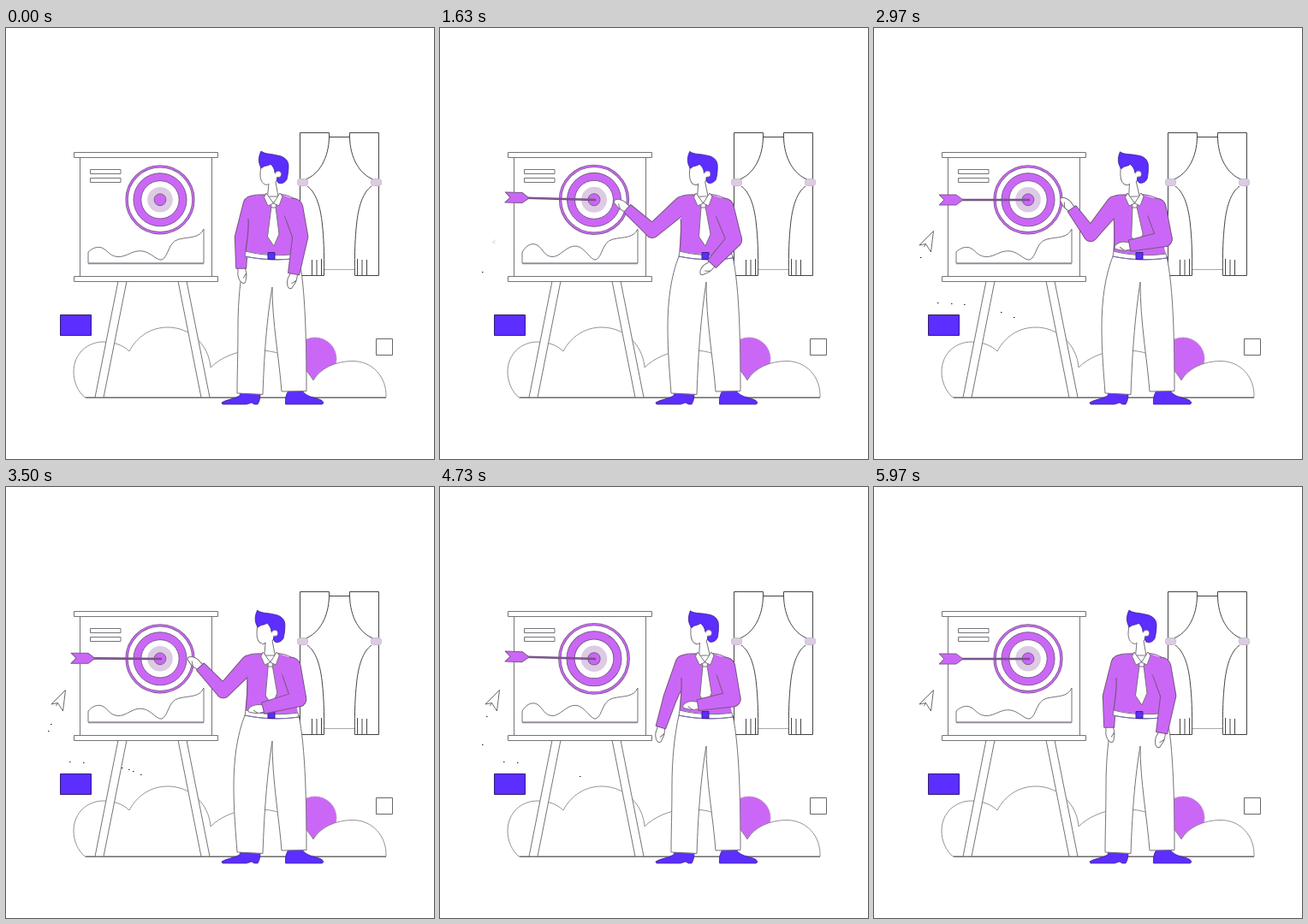
Recreate the animation shown at these times as an HTML page with a canvas. Size 500 px wide and 504 px high, loop 6010 ms.

```html
<!DOCTYPE html>
<html lang="en">
<head>
<meta charset="utf-8">
<title>Presentation</title>
<style>
html, body { margin: 0; width: 100%; height: 100%; overflow: hidden; background: #fff; }
canvas { display: block; }
</style>
</head>
<body>
<canvas id="stage" width="500" height="504"></canvas>
<script>
const ctx = document.getElementById('stage').getContext('2d');
const LOOP = 6010;
const PURPLE = '#cb67f6', BLUE = '#5c2eff', LILAC = '#dccbe3';
const GREY = '#77727a', DARK = '#444', WHITE = '#fff', SEAM = '#75567f';
const RAD = Math.PI / 180;

// Tracks: [time, ...values], eased between neighbours.
const BODY = [ // chest shift, head angle
  [0, 0, 0], [870, -7, -10], [1630, -5, -1.5], [2970, -8, -3],
  [4030, 0.5, 1.5], [4730, -3, -3], [5970, 0, 0]
];
const LEFT = [ // upper angle, upper length, fore angle, fore length
  [0, 107, 40, 91, 36], [780, 135, 49, 221, 39], [1630, 139, 47, 222, 39],
  [2970, 129, 45, 234, 37], [4030, 138, 44, 220, 41], [4150, 138, 44, 220, 41],
  [4900, 108, 42, 91, 36], [5900, 107, 40, 91, 36]
];
const RIGHT = [
  [0, 75, 34, 100, 44], [870, 71.6, 41, 87, 34], [1200, 71.6, 41, 87, 34],
  [2000, 72, 37, 169, 41], [2970, 74.5, 37, 169, 41], [4030, 76.7, 39, 162, 44],
  [4730, 76, 38, 170, 41], [5000, 76, 38, 170, 41], [5950, 75, 34, 100, 44]
];
// Trail dots: x, y, and a bit for each phase in which the dot shows.
const DOTS = [
  [54, 268, 10], [52, 277, 4], [49, 285, 5], [49, 301, 8], [74, 321, 14], [90, 322, 14],
  [105, 323, 2], [135, 328, 4], [143, 330, 4], [148, 332, 6], [157, 336, 4], [163, 338, 10]
];
const PHASES = [1500, 2300, 3500, 4400, 5600];

const mix = (a, b, k) => a + (b - a) * k;
const wave = (t, period) => (1 - Math.cos(t / period * 2 * Math.PI)) / 2;
function ease(t, a, b) {
  const k = Math.min(1, Math.max(0, (t - a) / (b - a)));
  return k * k * (3 - 2 * k);
}
function sample(track, t) {
  let i = 0;
  while (i < track.length - 2 && t >= track[i + 1][0]) i++;
  const a = track[i], b = track[i + 1], k = ease(t, a[0], b[0]);
  return a.slice(1).map((v, n) => mix(v, b[n + 1], k));
}

function draw(path, fill, stroke, width = 1) {
  const p = typeof path === 'string' ? new Path2D(path) : path;
  if (fill) { ctx.fillStyle = fill; ctx.fill(p); }
  if (stroke) { ctx.strokeStyle = stroke; ctx.lineWidth = width; ctx.stroke(p); }
}
function disc(x, y, r, fill, stroke, width) {
  const p = new Path2D();
  p.arc(x, y, r, 0, 7);
  draw(p, fill, stroke, width);
}
function box(x, y, w, h, fill, stroke, r = 0) {
  const p = new Path2D();
  p.roundRect(x, y, w, h, r);
  draw(p, fill, stroke);
}
function place(x, y, angle, scale, fn) {
  ctx.save();
  ctx.translate(x, y);
  ctx.rotate(angle * RAD);
  ctx.scale(scale, scale);
  fn();
  ctx.restore();
}

function curtain() {
  draw('M343.5 122.5H377.5V127.5C377 152 366 171 350 177 M343.5 122.5V289.5H371.5' +
    'C372 262 371 244 369.5 230C367.5 209 362 192 352 185 M357.5 271V289 M363 271V289 M368.5 270V289', null, DARK);
  box(340.5, 176.5, 12, 8, LILAC, '#c9bccf', 3);
}
function room() {
  draw('M377 127.5H402', null, DARK);
  draw('M372 282.5H407', null, '#aaa');
  curtain();
  ctx.save();
  ctx.translate(779, 0);
  ctx.scale(-1, 1);
  curtain();
  ctx.restore();

  disc(361, 387, 25, PURPLE, '#b98acb', 0.8);
  draw('M92 432C84 425 79 414 79 402C79 381 95 367 114 367C126 367 137 371 144 378' +
    'C153 361 169 350 189 350C215 350 237 370 239 397C250 386 268 378 286 377' +
    'C318 375 344 387 359 412C367 398 385 389.5 405 389.5C428 389.5 445 408 444 432Z', WHITE, '#777', 0.8);
  draw('M93 432.3H444', null, '#555');
  box(63.5, 335.5, 36, 24, BLUE, '#332070');
  box(432.5, 363.5, 19, 19, WHITE, '#666');
}

function board(s, beat) {
  draw('M131 296H141L114 432H104Z M201 296H211L238 432H228Z', WHITE, GREY);
  box(86.5, 151.5, 154, 139, WHITE, GREY);
  box(79.5, 145.5, 168, 6, WHITE, GREY);
  box(79.5, 290.5, 168, 6, WHITE, GREY);
  box(98.5, 165.5, 35.5, 5, WHITE, GREY);
  box(98.5, 175.5, 35.5, 5, WHITE, GREY);

  const a = 257 - 4 * s, b = 261 - 6 * s;
  draw(`M96 275V262C102 ${a - 1} 109 ${a - 2} 114 ${a + 1}C120 ${a + 5} 122 267 131 267.5` +
    `C141 268 148 ${b - 2} 160 ${b}C170 ${b + 2} 176 272 182 271C190 268 189 250 202 247C215 244 226 246 231 235V275Z`, WHITE, GREY);
  draw('M96 275.5H231', null, '#93899a', 1.6);

  place(180, 200.8, 0, 0.985 + 0.033 * beat, () => {
    disc(0, 0, 39.5, WHITE, '#7c5a8c', 3.4);
    disc(0, 0, 39.5, null, PURPLE, 1.8);
    disc(0, 0, 31.5, PURPLE, '#7c5a8c');
    disc(0, 0, 22.5, WHITE, '#7c5a8c');
    disc(0, 0, 15, LILAC);
    disc(0, 0, 7, PURPLE, '#7c5a8c');
  });
}

function arrow(t, s) {
  const fly = ease(t, 200, 500);
  if (!fly) return;
  ctx.globalAlpha = Math.min(1, fly * 2);
  place(181 - 44 * (1 - fly), 201, 1.7 * s, 1, () => {
    draw('M-80 0H1', null, '#6b4a7d', 2.6);
    draw('M-80 0H0', null, '#94609f', 0.8);
    draw('M-105 -6H-85L-77 0L-85 6H-105L-99 0Z', PURPLE, '#7c5a8c');
  });
  ctx.globalAlpha = 1;
}

function plane(t) {
  const k = ease(t, 1450, 2100);
  if (k) place(63, 250, 0, k, () =>
    draw('M6.5 -12.5L-10 4L-2.5 2.5L3.5 12Z M-2.5 2.5L-4.5 6', null, '#444', 0.8));
  const n = PHASES.findLastIndex(p => t >= p);
  if (n < 0 || n > 3) return;
  ctx.fillStyle = '#222';
  for (const [x, y, mask] of DOTS) if (mask >> n & 1) ctx.fillRect(x, y, 1.5, 1);
}

// Tapered segment with a round end at each joint.
function segment(a, b, ra, rb, flat) {
  const d = Math.atan2(b.y - a.y, b.x - a.x), q = Math.PI / 2;
  const p = new Path2D();
  p.arc(a.x, a.y, ra, d + q, d - q);
  if (flat) {
    p.lineTo(b.x + rb * Math.sin(d), b.y - rb * Math.cos(d));
    p.lineTo(b.x - rb * Math.sin(d), b.y + rb * Math.cos(d));
  } else p.arc(b.x, b.y, rb, d - q, d + q);
  p.closePath();
  return p;
}
const along = (p, angle, len) => ({ x: p.x + len * Math.cos(angle * RAD), y: p.y + len * Math.sin(angle * RAD) });

function arm(shoulder, pose, r, bend) {
  const [ua, ul, fa, fl] = pose;
  const elbow = along(shoulder, ua, ul), wrist = along(elbow, fa, fl);
  place(wrist.x, wrist.y, fa + bend, 1, () =>
    draw('M-3 -4C3 -5 7 -6 10 -5L17 -3C19 -1 18 1 15 3C11 5 6 5 3 4L-3 4Z M7 -5C10 -3 11 -2 12 -1', WHITE, GREY));
  const parts = [segment(shoulder, elbow, r[0], r[1]), segment(elbow, wrist, r[1], r[2], true)];
  parts.forEach(p => draw(p, null, SEAM, 2));
  parts.forEach(p => draw(p, PURPLE));
}

function legs(k) {
  draw('M253 440L252 438C258 434 267 434 273 430L274 426L297 427C297 433 296 437 294 440H290L287 438L281 440Z', BLUE, '#38208f', 0.8);
  draw('M326.5 440C326 433 327 429 330 424H346C351 432 362 432 368 435C371 437 372 439 369 440Z', BLUE, '#38208f', 0.8);
  const x = mix(271, 266, k), y = mix(303, 297, k);
  draw(`M279 267C${mix(274, 270, k)} 290 ${x} 318 ${x} 350C${x} 380 ${mix(270, 268.5, k)} 405 270 427L300 428.5` +
    `C301 400 303 350 311 ${y}C311 345 319 385 322 425L351 424.5C351 370 350 305 342 267Z`, WHITE, GREY);
}

function head(dx, angle) {
  place(312 + dx, 193, angle, 1, () => {
    ctx.translate(-312, -193);
    draw('M298 158L297 171C297 177 299 182 303 183C305 184 306 183 307 182L305.5 197H318L315 180L322 170L315 152Z', WHITE, GREY);
    draw('M298 144C303 148 311 147 317 149C325 150 330.5 155 330 162C330 168 329 173 328 177' +
      'C326 181 321 183 318 181C316 179 316 176 317 174L314 169C314 165 312 162 309 159' +
      'C306 162 302 160 298.5 164C295 159 294 152 298 144Z', BLUE, '#38208f', 0.8);
    disc(318, 171, 3.5, WHITE);
    draw('M315.5 169C317 166 321.5 167 321.5 171C321.5 174 319 175 317 174', null, GREY, 0.7);
  });
}

function man(t) {
  const [dx, angle] = sample(BODY, t);
  const k = ease(t, 0, 800) - ease(t, 4150, 4750);
  const sx = 0.7 * dx;
  legs(k);

  arm({ x: 287 + sx, y: 206.5 }, sample(LEFT, t), [9.5, 7.5, 5.5], -8);

  const l = 286 + sx, r = 336 + sx;
  const chest = new Path2D(`M${l} 196L${303 + dx} 194.5H${321 + dx}L${r} 200V225L341 264C320 267 298 265 280 261L${283 + sx / 2} 228L${l} 215Z`);
  const top = `M${l} 196.5C${l + 5} 194.5 ${l + 10} 195 ${303 + dx} 195M${321 + dx} 194.5C${327 + dx} 195 ${r - 5} 196.5 ${r} 199.3`;
  draw(chest, PURPLE);
  draw(`M${283 + sx / 2} 223C${284 + sx / 2} 240 281 250 280 261`, null, SEAM, 1.2);

  // Belt
  draw('M280 261C298 266 322 267 341 264L342 269C322 272 298 271 279 267Z', WHITE, GREY);
  draw('M279 267C298 271 322 272 342 269', null, '#7970b5', 1.2);
  box(306, 262.5, 8, 8, BLUE, '#38208f');

  draw(`M${304 + dx} 194H${321 + dx}L${312.5 + dx} 206Z`, WHITE);
  head(dx, angle);

  const tx = 0.6 * dx;
  draw(`M${310 + dx} 209H${315 + dx}L${319 + tx} 241L${313 + tx} 255L${305.5 + tx} 244Z`, WHITE, GREY);

  const s = { x: 335 + sx, y: 211 };
  arm(s, sample(RIGHT, t), [11.5, 8.5, 6.2], 8);
  // Blend the sleeve into the chest.
  ctx.save();
  ctx.clip(chest);
  disc(s.x, s.y, 13, PURPLE);
  ctx.restore();
  draw(top, null, SEAM);

  ctx.save();
  ctx.translate(dx, 0);
  draw('M309.5 204H316L315 210H310Z', WHITE, GREY);
  draw('M304 193L312.5 205L306 208L301.5 198Z M320 193L312.5 205L319 208L323 197Z', WHITE, GREY);
  ctx.restore();
}

function frame() {
  const t = (performance.now() - start) % LOOP;
  const sway = wave(t + 30, 3000);
  const beat = wave(t - 250, 1000) ** 6;
  ctx.fillStyle = WHITE;
  ctx.fillRect(0, 0, 500, 504);
  room();
  board(sway, beat);
  arrow(t, sway);
  plane(t);
  man(t);
  requestAnimationFrame(frame);
}
ctx.lineJoin = 'round';
const start = performance.now();
frame();
</script>
</body>
</html>
```
